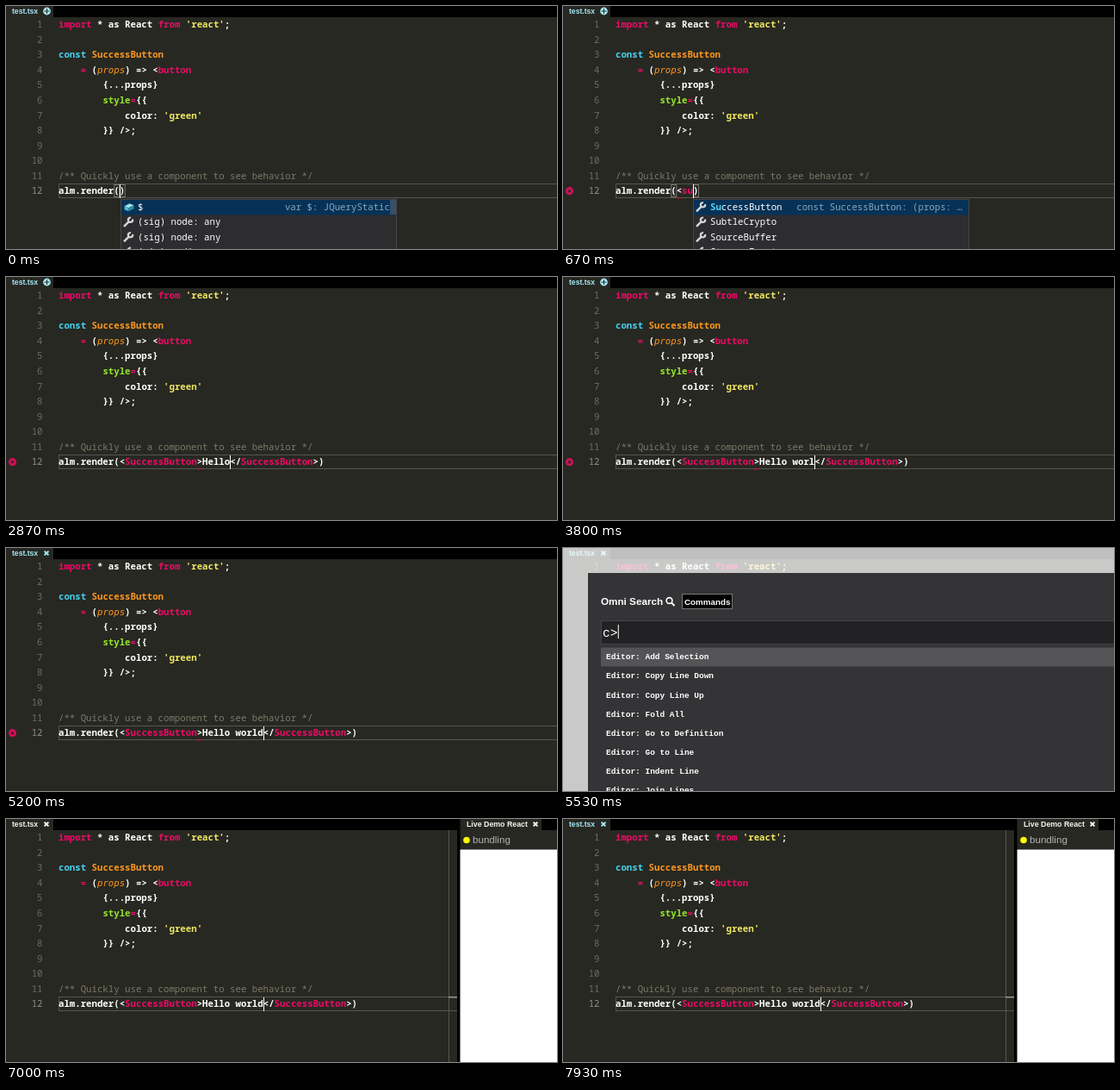
Animation of 640 by 282 pixels, one loop 8 s. Source, as an HTML page with a canvas:

```html
<!DOCTYPE html>
<html>
<head>
<meta charset="utf-8">
<style>
html, body { margin: 0; width: 640px; height: 282px; overflow: hidden; background: #272822; }
canvas { display: block; }
</style>
</head>
<body>
<canvas id="stage" width="640" height="282"></canvas>
<script>
const ctx = document.getElementById('stage').getContext('2d');

const CODE = '600 10.71px "Noto Sans Mono", monospace';
const PLAIN = '10.71px "Noto Sans Mono", monospace';
const ITALIC = 'italic 10.71px "DejaVu Sans Mono", monospace';
const LIST = 'bold 9.47px "Liberation Mono", monospace';
const sans = (size, weight = 'bold') => `${weight} ${size}px "Liberation Sans", sans-serif`;
const CHAR = 6.426, LEFT = 61, LINE = 17.55, BASE = 25.2;
const W = '#fff', PINK = '#ec0a66', ORANGE = '#fd971f', CYAN = '#45d2f0',
      GREEN = '#96e62a', YELLOW = '#f0e860', GRAY = '#7d7968', BG = '#272822', EDGE = '#55564f';

// Each line: indent in characters, then text and colour pairs
const LINES = [
  [0, 'import', PINK, ' * as React ', W, 'from', PINK, " 'react'", YELLOW, ';', W],
  [0],
  [0, 'const ', CYAN, 'SuccessButton', ORANGE],
  [4, '=', PINK, ' (', W, 'props', ORANGE, ') => <', W, 'button', PINK],
  [8, '{...props}', W],
  [8, 'style', GREEN, '=', PINK, '{{', W],
  [12, 'color: ', W, "'green'", YELLOW],
  [8, '}} />;', W],
  [0], [0],
  [0, '/** Quickly use a component to see behavior */', GRAY]
];

const TAG_KEYS = [400, 530, 660, 800, 930, 1070];
const HELLO_KEYS = [2270, 2400, 2530, 2670, 2800, 3000, 3200, 3400, 3600, 3800, 4000];
const SEARCH_KEYS = [5600, 5700, 5800, 5900, 6030, 6100, 6270, 6400, 6500];
const PICKED = 1650, CLOSED_TAG = 1870, SAVED = 4800, MODAL = 5400, SPLIT = 6850;

const typed = (text, times, t) => text.slice(0, times.filter(k => k <= t).length);
const between = (t, a, b) => t >= a && t < b;

function rect(x, y, w, h, color) {
  ctx.fillStyle = color;
  ctx.fillRect(x, y, w, h);
}

function frame(x, y, w, h, color) {
  ctx.strokeStyle = color;
  ctx.lineWidth = 1;
  ctx.strokeRect(x + .5, y + .5, w - 1, h - 1);
}

function text(s, x, y, color, font = PLAIN) {
  ctx.font = font;
  ctx.fillStyle = color;
  ctx.fillText(s, x, y);
}

function dot(x, y, r, color) {
  ctx.fillStyle = color;
  ctx.beginPath();
  ctx.arc(x, y, r, 0, 7);
  ctx.fill();
}

function path(color, width, ...points) {
  ctx.strokeStyle = color;
  ctx.lineWidth = width;
  ctx.beginPath();
  for (let i = 0; i < points.length; i += 2) ctx.lineTo(points[i], points[i + 1]);
  ctx.stroke();
}

function cross(x, y, r, color, width) {
  path(color, width, x - r, y - r, x + r, y + r);
  path(color, width, x - r, y + r, x + r, y - r);
}

// Draws coloured pieces on the character grid and returns the end column
function pieces(col, row, parts) {
  for (let i = 0; i < parts.length; i += 2) {
    const [s, color] = [parts[i], parts[i + 1]];
    const font = s === 'props' ? ITALIC : color === GRAY ? PLAIN : CODE;
    text(s, LEFT + col * CHAR, BASE + row * LINE, color, font);
    col += s.length;
  }
  return col;
}

function squiggle(col, count) {
  const points = [];
  for (let i = 0; i <= count * 3; i++) points.push(LEFT + col * CHAR + i * CHAR / 3, 222 + i % 2 * 1.5);
  path('#d8103c', 1, ...points);
}

function tabs(t) {
  rect(0, 0, 640, 13, '#000');
  rect(0, 0, 55, 13, BG);
  const color = between(t, SPLIT, 7870) ? '#f4f4f4' : '#a5e8f6';
  text('test.tsx', 7, 9, color, sans(8.6));
  if (t < SAVED) {
    dot(47.5, 6, 4.4, color);
    path(BG, 1, 44.5, 6, 50.5, 6);
    path(BG, 1, 47.5, 3, 47.5, 9);
  } else cross(47, 6, 2.4, color, 2);
}

function lastLine(t) {
  const tag = typed('<succe', TAG_KEYS, t);
  const words = typed('Hello world', HELLO_KEYS, t);
  const done = t >= CLOSED_TAG;
  frame(LEFT, 206, 600, 17, EDGE);

  let col = pieces(0, 11, ['alm.render(', W]);
  if (tag) col = pieces(col, 11, ['<', W, t < PICKED ? tag.slice(1) : 'SuccessButton', PINK]);
  if (done) col = pieces(col, 11, ['>' + words, W]);
  const caret = LEFT + col * CHAR;
  pieces(col, 11, done ? ['</', W, 'SuccessButton', PINK, '>)', W] : [')', W]);

  if (!done) {
    frame(LEFT + 10 * CHAR, 207, 7, 15, '#777a70');
    frame(caret, 207, 7, 15, '#777a70');
  }
  rect(Math.round(caret), 207, 1, 16, '#fff');

  if (between(t, 600, 5350)) {
    dot(7.5, 214.7, 4.6, '#cf1058');
    cross(7.5, 214.7, 1.4, BG, 1.2);
    done ? squiggle(25, 1) : squiggle(11, 1);
  }
  return caret;
}

function wrench(x, y) {
  path('#d5d5d5', 2.4, x - 5, y + 5, x + 1, y - 1);
  ctx.strokeStyle = '#d5d5d5';
  ctx.lineWidth = 2.2;
  ctx.beginPath();
  ctx.arc(x + 2.5, y - 2.5, 2.6, -.3, 4.9);
  ctx.stroke();
}

function cube(x, y) {
  const face = (color, ...p) => {
    ctx.fillStyle = color;
    ctx.beginPath();
    for (let i = 0; i < p.length; i += 2) ctx.lineTo(x + p[i], y + p[i + 1]);
    ctx.fill();
  };
  face('#a5e2ee', -5, -1, 1, -4, 6, -2, 0, 1);
  face('#51b6cb', -5, -1, 0, 1, 0, 5, -5, 3);
  face('#2e8da5', 0, 1, 6, -2, 6, 2, 0, 5);
}

function popup(x, rows, detail, match = 0, bar = false) {
  x = Math.round(x);
  const height = rows.length * 17.5;
  rect(x, 224, 321, height + 1, '#2d2d30');
  rect(x, 225, 320, 17.5, '#073257');
  frame(x, 224, 321, Math.round(height) + 1, '#454549');
  rows.forEach((label, i) => {
    const y = 233.3 + i * 17.5;
    label === '$' ? cube(x + 9.5, y) : wrench(x + 9, y);
    const split = i ? 0 : match;
    text(label.slice(0, split), x + 20, y + 3.6, '#4fd5f5', CODE);
    text(label.slice(split), x + 20 + split * CHAR, y + 3.6, W);
  });
  text(detail, x + 313 - detail.length * CHAR, 236.9, '#86a9bf');
  if (bar) rect(x + 313, 225, 7, 17, '#35516a');
}

function suggestions(t, caret) {
  const n = typed('<succe', TAG_KEYS, t).length;
  const button = 'const SuccessButton: (props: …';
  if (n === 0) {
    popup(133, ['$', '(sig) node: any', '(sig) node: any', '(sig) radix: any'], 'var $: JQueryStatic', 0, true);
  } else if (n > 1 && t < PICKED) {
    const all = ['SuccessButton', 'SubtleCrypto', 'SourceBuffer', 'StorageEvent'];
    popup(caret, all.slice(0, [4, 4, 4, 2, 1][n - 2]), button, n - 1);
  } else if (between(t, 3200, 3400)) {
    popup(caret, ['window', 'WebSocket', 'WheelEvent', 'Worker'], 'var window: Window', 1);
  }
}

function editor(t) {
  rect(0, 0, 640, 282, BG);
  LINES.forEach(([indent, ...parts], row) => pieces(indent, row, parts));
  ctx.textAlign = 'right';
  for (let i = 0; i < 12; i++) text(i + 1, 42.5, BASE + i * LINE, i < 11 ? '#6c6d67' : '#8f908a');
  ctx.textAlign = 'left';
  suggestions(t, lastLine(t));
  tabs(t);
}

function preview() {
  rect(514, 13, 1, 269, EDGE);
  rect(514, 206, 10, 1.5, '#9a9b95');
  rect(524, 0, 116, 282, '#000');
  rect(527.5, 0, 94.5, 13, BG);
  rect(527.5, 13, 113, 23, BG);
  rect(527.5, 35.5, 113, 247, '#fff');
  text('Live Demo React', 535, 9, '#f4f4f4', sans(8.8));
  cross(615, 6, 2.4, '#f4f4f4', 2);
  dot(535, 24.5, 3.8, '#ff0');
  text('bundling', 542, 28.3, '#b4b4b0', sans(11.6, 'normal'));
}

// Square brackets mark the matched letters
const GENERAL = ['Editor: Add Selection', 'Editor: Copy Line Down', 'Editor: Copy Line Up', 'Editor: Fold All',
  'Editor: Go to Definition', 'Editor: Go to Line', 'Editor: Indent Line', 'Editor: Join Lines'];
const REACT = ['TypeScript: [Demo r]eact file', 'TypeScript: [Demo r]eact stop'];
const DEMO = ['TypeScript: [Demo] file', 'TypeScript: [Demo] stop', 'TypeScript: [Demo] react file',
  'TypeScript: [Demo] react stop', 'E[d]itor: R[emo]ve Line Comment', 'E[d]itor: R[emo]ve unused imports',
  'E[d]itor: Go to Impl[em]entati[o]n', 'E[d]itor: Cr[e]ate [M]ultiple Curs[o]rs from Selected Lines'];

function modal(t) {
  rect(0, 0, 640, 282, 'rgba(255,255,255,.75)');
  rect(29, 29, 611, 253, '#343335');
  text('Omni Search', 44, 66, '#fff', sans(11.7));
  ctx.strokeStyle = '#fff';
  ctx.lineWidth = 1.6;
  ctx.beginPath();
  ctx.arc(123.5, 61, 3.4, 0, 7);
  ctx.stroke();
  path('#fff', 2, 126, 63.5, 129.5, 67);
  rect(138, 53, 59, 18, '#000');
  frame(138, 53, 59, 18, '#777');
  text('Commands', 141, 65.7, '#fff', sans(9.8));

  rect(44, 84, 596, 28, '#222123');
  frame(44, 84, 600, 28, '#454446');
  const query = 'c>' + typed('demo reac', SEARCH_KEYS, t);
  text(query, 46, 102.5, '#fff', '14.4px "Liberation Mono", monospace');
  rect(46.5 + query.length * 8.64, 89, 1, 16, '#fff');

  rect(44, 115.5, 596, 22, '#545356');
  const rows = t < 5800 ? GENERAL : t < 6270 ? DEMO : REACT;
  rows.forEach((row, i) => {
    let x = 50;
    row.split(/[[\]]/).forEach((part, k) => {
      text(part, x, 129.3 + i * 22.15, k % 2 ? '#66e6f2' : '#fff', LIST);
      x += part.length * 5.683;
    });
  });
}

function draw() {
  const t = performance.now() % 8000;
  editor(t);
  if (between(t, MODAL, SPLIT)) modal(t);
  if (t >= SPLIT) preview();
  requestAnimationFrame(draw);
}
draw();
</script>
</body>
</html>
```
